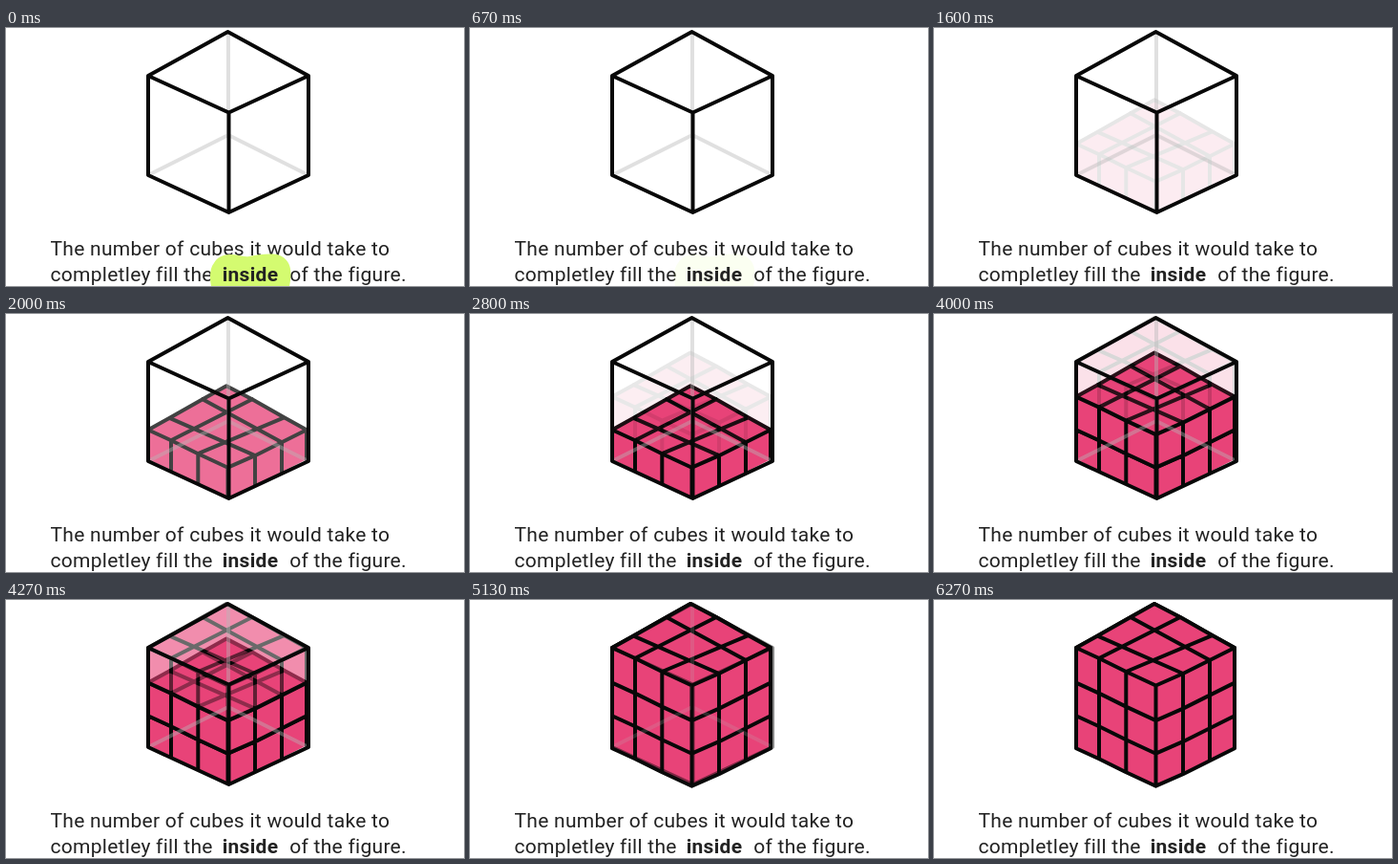
An HTML page for the animation above (6390 ms loop, 480x270 px).

```html
<!DOCTYPE html>
<html lang="en">
<head>
<meta charset="utf-8">
<title>Volume</title>
<style>
  html, body { margin: 0; width: 100%; height: 100%; overflow: hidden; background: #fff; }
  svg { display: block; width: 100vw; height: 100vh; }
  text { font: 21px Roboto, sans-serif; letter-spacing: 0.28px; fill: #222; }
  .bold { font-weight: 700; }
  .line { fill: none; stroke: #080808; stroke-width: 4; stroke-linejoin: round; stroke-linecap: round; }
  .back { fill: none; stroke: #b6b6b6; stroke-opacity: 0.42; stroke-width: 4; stroke-linejoin: round; }
  .pink { fill: #e84378; }
</style>
</head>
<body>
<svg viewBox="0 0 480 270">
  <text x="46.5" y="237.9">The number of cubes it would take to</text>
  <text x="46.5" y="265.2">completley fill the</text>
  <text x="297.3" y="265.2">of the figure.</text>
  <path id="blob" fill="#d4fb70" d="M216 274C213 264 213 252 218 246C221 240 228 237 235 237C243 237 248 240 255 239C264 237 275 236 284 237C292 239 297 245 298 252C299 260 298 267 296 274Z"/>
  <text class="bold" x="226.7" y="265.2">inside</text>
  <g id="cubes"></g>
  <g id="box">
    <path class="back" d="M233 6V112M149 154L233 112L317 154"/>
    <path class="line" d="M232.5 4L317 50V154L233.5 193L149 154V50ZM149 50L233.5 88.5L317 50M233.5 88.5V193"/>
  </g>
</svg>
<script>
const LOOP = 6390;
const FADE = 600;
const byId = id => document.getElementById(id);

// Points along the four edges of the top face, and the depth of each layer.
const frontLeft = [[149, 50], [173, 61], [201.3, 75], [232.5, 89.5]];
const frontRight = [[232.5, 89.5], [261, 77], [289, 63], [315, 50]];
const backLeft = [[149, 50], [171.5, 37.6], [206, 18], [231, 4]];
const backRight = [[231, 4], [258, 18], [291.5, 37.1], [315, 50]];
const depth = [0, 36.6, 71.2, 105.2];

const front = frontLeft.concat(frontRight.slice(1));
const rim = backLeft.concat(backRight.slice(1));
const drop = (points, dy) => points.map(([x, y]) => [x, y + dy]);
const path = points => "M" + points.map(p => p.join(" ")).join("L");

function add(parent, tag, attrs) {
  const el = document.createElementNS("http://www.w3.org/2000/svg", tag);
  for (const key in attrs) el.setAttribute(key, attrs[key]);
  parent.appendChild(el);
  return el;
}

// A block of cubes between two depth levels.
function block(top, bottom, closed) {
  const g = add(byId("cubes"), "g", {});
  const low = depth[bottom] - (closed ? 0 : 3);
  const outline = drop(rim, depth[top]).concat(drop(front, low).reverse());
  add(g, "path", { class: "pink", d: path(outline) + "Z" });

  let d = path(drop(rim, depth[top]));
  for (let level = top; level <= bottom; level++) {
    if (level < bottom || closed) d += path(drop(front, depth[level]));
  }
  for (const [x, y] of front) d += path([[x, y + depth[top]], [x, y + low]]);
  for (const i of [1, 2]) {
    d += path(drop([frontLeft[i], backRight[i]], depth[top]));
    d += path(drop([frontRight[i], backLeft[i]], depth[top]));
  }
  add(g, "path", { class: "line", d });
  return g;
}

const parts = [
  { el: block(2, 3, false), start: 1545 },
  { el: block(1, 2, true), start: 2750 },
  { el: block(0, 1, true), start: 3910 },
  { el: block(0, 3, true), start: 4540 }
];

const ramp = (t, start, length) => Math.min(1, Math.max(0, (t - start) / length));

function draw(t) {
  byId("blob").style.opacity = 1 - ramp(t, 20, 720);
  for (const { el, start } of parts) el.style.opacity = ramp(t, start, FADE);
  byId("box").style.opacity = 1 - ramp(t, 4720, 780);
}

const begin = performance.now();
function tick() {
  draw((performance.now() - begin) % LOOP);
  requestAnimationFrame(tick);
}
tick();
</script>
</body>
</html>
```
